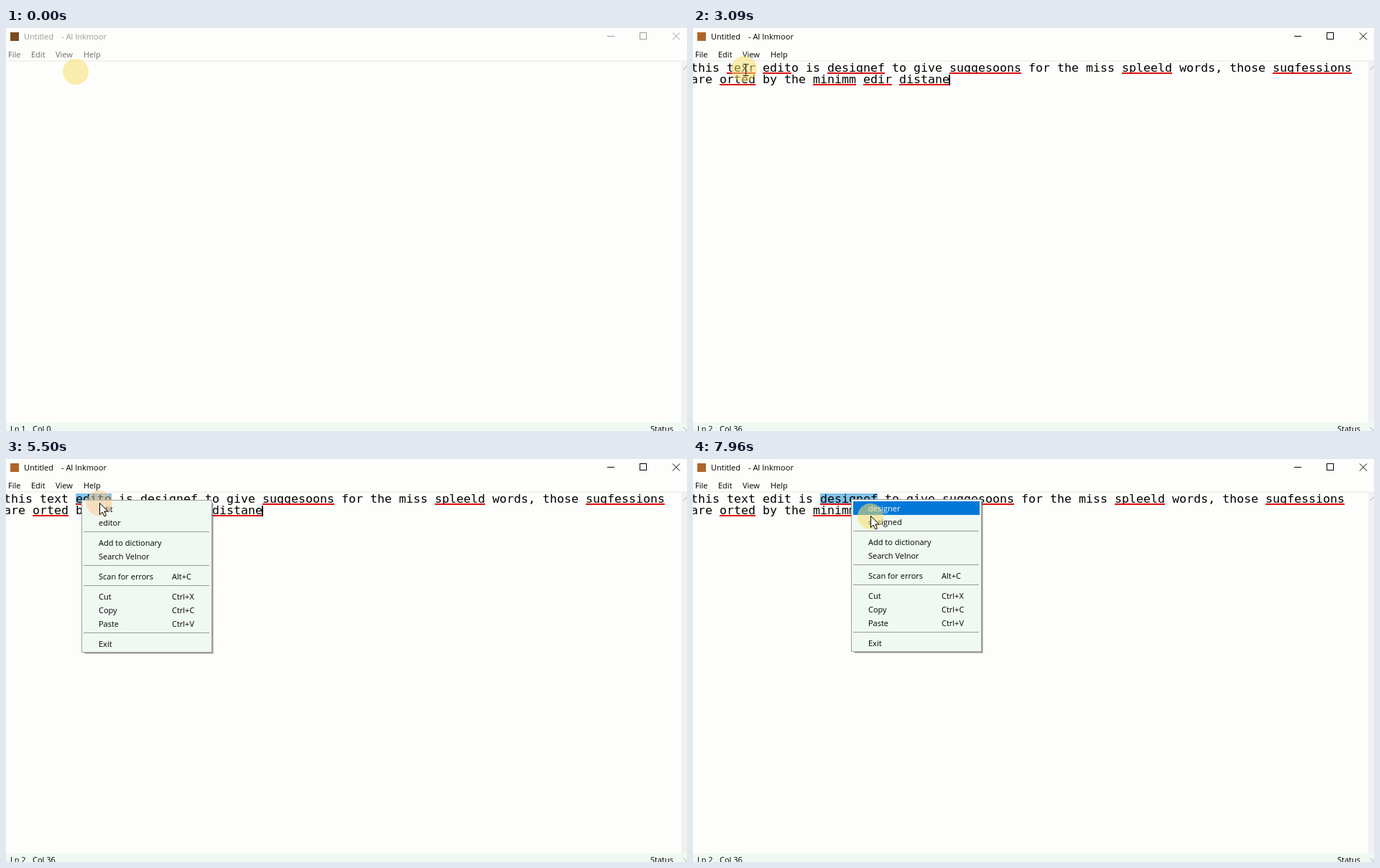
An HTML page with a canvas that plays this animation: 948x562 px, repeating every 8 s.

```html
<!DOCTYPE html>
<html lang="en">
<head>
<meta charset="utf-8">
<title>Text editor</title>
<style>
  html, body { margin: 0; width: 100%; height: 100%; overflow: hidden; background: #fdfefb; }
  canvas { display: block; }
</style>
</head>
<body>
<canvas id="stage" width="948" height="562"></canvas>
<script>
const ctx = document.getElementById('stage').getContext('2d');
const LOOP = 8000, FOCUS = 600, PASTE = 1490, CHECKED = 2020;
const UI = '11px "Open Sans", "Noto Sans", sans-serif';
const MONO = '16.61px "DejaVu Sans Mono", monospace';
const INK = '#000', PANEL = '#f0f8f2', BLUE = '#0078d7';
const CHAR = 10, TEXT_X = -3, ROW = 19, GAP = 9, HOVER_LAG = 180;

// Each menu opens at (x, y); the pointer then glides to target and clicks.
const menus = [
  { open: 3400, click: 4590, x: 71, y: 57, target: [102, 84],
    word: 'texr', suggestions: ['tear', 'text'] },
  { open: 5200, click: 6420, x: 105, y: 57, target: [153, 66],
    word: 'edito', suggestions: ['edit', 'editor'] },
  { open: 7250, click: LOOP, x: 220, y: 56, target: [247, 80],
    word: 'designef', suggestions: ['designer', 'designed'] }
];
for (const menu of menus) menu.close = menu.click + 50;

const commands = ['-', 'Add to dictionary', 'Search Velnor', '-', 'Scan for errors|Alt+C', '-',
  'Cut|Ctrl+X', 'Copy|Ctrl+C', 'Paste|Ctrl+V', '-', 'Exit'];
const misspelt = /\b(texr|edit(?=o)|designef|suggesoons|spleeld|sugfessions|orted|minimm|edir|distane)/g;
const clicks = menus.flatMap(m => [m.open - 70, m.click]);

// Pointer stops: time, x, y. It rests inside the last menu before moving on.
const stops = [[0, 97, 61], [2000, 97, 61]];
for (const { open, click, x, y, target } of menus) {
  stops.push([open - 50, x, y], [open + 50, x, y]);
  if (click === LOOP) stops.push([open + 230, x + 11, y + 6], [click - 120, x + 11, y + 6]);
  stops.push([Math.min(click, LOOP - 40), ...target]);
}

function pointerAt(t) {
  const next = stops.findIndex(s => s[0] > t);
  if (next < 0) return stops[stops.length - 1].slice(1);
  const [t0, x0, y0] = stops[next - 1], [t1, x1, y1] = stops[next];
  const eased = 1 - (1 - (t - t0) / (t1 - t0)) ** 3;
  return [x0 + (x1 - x0) * eased, y0 + (y1 - y0) * eased];
}

function rect(x, y, w, h, color) {
  ctx.fillStyle = color;
  ctx.fillRect(x, y, w, h);
}

function text(str, x, y, color = INK, font = UI) {
  ctx.font = font;
  ctx.fillStyle = color;
  ctx.fillText(str, x, y);
}

function line(color, x0, y0, x1, y1) {
  ctx.strokeStyle = color;
  ctx.lineWidth = 1;
  ctx.beginPath();
  ctx.moveTo(x0, y0);
  ctx.lineTo(x1, y1);
  ctx.stroke();
}

function drawWindow(t) {
  const active = t >= FOCUS, checked = t >= CHECKED;
  const title = active ? INK : '#999', label = active ? INK : '#6d6d6d';
  rect(0, 0, 948, 562, '#fdfefb');
  rect(0, 45, 948, 2, '#f0f3ee');
  rect(940, 47, 8, 515, '#f0f2f0');
  rect(0, 550, 948, 12, PANEL);
  rect(6, 6, 12, 12, active ? '#b06428' : '#7a4a20');
  text('Untitled', 25, 16, title);
  text('- AI Inkmoor', 77, 16, title);
  text('File', 3, 41, label);
  text('Edit', 35, 41, label);
  text('View', 69, 41, label);
  text('Help', 108, 41, label);

  line(title, 837, 11.5, 847, 11.5);
  ctx.strokeRect(882.5, 6.5, 9, 9);
  line(title, 928, 6.5, 938, 16.5);
  line(title, 938, 6.5, 928, 16.5);
  line('#a0a0a0', 943, 58, 948, 53);
  line('#a0a0a0', 943, 557, 948, 562);

  text(checked ? 'Ln 2' : 'Ln 1', 6, 563);
  text(checked ? 'Col 36' : 'Col 0', 37, 563);
  text('Status', 897, 563);
}

function drawDocument(t) {
  if (t < PASTE) return;
  const first = t < menus[0].click ? 'texr' : 'text';
  const second = t < menus[1].close ? 'edito' : 'edit';
  const content = [
    `this ${first} ${second} is designef to give suggesoons for the miss spleeld words, those sugfessions`,
    'are orted by the minimm edir distane'
  ];
  const menu = menus.find(m => t >= m.open && t < m.close);
  if (menu) {
    const start = content[0].indexOf(menu.word);
    if (start >= 0) rect(TEXT_X + start * CHAR, 48, menu.word.length * CHAR, 15, '#80c2e8');
  }
  content.forEach((row, i) => {
    const y = 61 + i * 16;
    text(row, TEXT_X, y, INK, MONO);
    if (t < CHECKED) return;
    for (const match of row.matchAll(misspelt))
      rect(TEXT_X + match.index * CHAR, y + 1, match[0].length * CHAR, 2, '#dc1010');
  });
  if (t >= CHECKED) rect(356, 65, 2, 15, INK);
}

function drawSuggestion(menu, i, hot) {
  const y = menu.y + 3 + i * ROW;
  if (hot) rect(menu.x + 3, y, 176, ROW, BLUE);
  text(menu.suggestions[i], menu.x + 24, y + 14, hot ? '#fff' : INK);
}

function drawMenu(menu, t) {
  if (t < menu.open) return;
  const { x, y } = menu;
  // Highlighting trails the pointer.
  const hoverY = pointerAt(Math.min(t, menu.click) - HOVER_LAG)[1];
  const hot = Math.floor((hoverY - y - 3) / ROW);

  if (t < menu.close) {
    ctx.globalAlpha = Math.min(1, 0.3 + (t - menu.open) / 150);
    rect(x + 5, y + 5, 179, 210, 'rgba(80,80,80,.3)');
    rect(x + 4, y + 4, 179, 210, 'rgba(80,80,80,.4)');
    rect(x, y, 182, 213, '#a0a0a0');
    rect(x + 1, y + 1, 180, 211, PANEL);
    menu.suggestions.forEach((_, i) => drawSuggestion(menu, i, i === hot));
    let top = y + 3 + menu.suggestions.length * ROW;
    for (const command of commands) {
      if (command === '-') {
        rect(x + 3, top + 3, 175, 1, '#989898');
        top += GAP;
      } else {
        const [name, keys = ''] = command.split('|');
        text(name, x + 24, top + 14);
        text(keys, x + 126, top + 14);
        top += ROW;
      }
    }
  } else {
    // The chosen entry lingers and fades after the menu closes.
    const alpha = Math.min(1, 1 - (t - menu.click - 100) / 350);
    if (alpha <= 0) return;
    ctx.globalAlpha = alpha;
    drawSuggestion(menu, hot, true);
  }
  ctx.globalAlpha = 1;
}

function circle(x, y, r) {
  ctx.beginPath();
  ctx.arc(x, y, r, 0, Math.PI * 2);
}

function drawPointer(t) {
  const [x, y] = pointerAt(t);
  const click = clicks.find(c => t >= c && t < c + 400);
  circle(x, y, 18);
  ctx.fillStyle = click === undefined ? 'rgba(248,222,110,.55)' : 'rgba(250,200,140,.5)';
  ctx.fill();
  if (click !== undefined) {
    const age = (t - click) / 400;
    circle(x, y, 9 + 14 * age);
    ctx.strokeStyle = `rgba(${205 + 40 * age},${40 + 120 * age},120,${0.75 * (1 - age)})`;
    ctx.lineWidth = 4 - 3 * age;
    ctx.stroke();
  }

  if (t < FOCUS) return;
  ctx.save();
  if (menus.some(m => t >= m.open && t < m.click)) {
    ctx.translate(Math.round(x) + 0.5, Math.round(y) - 0.5);
    const arrow = new Path2D('M0 0V16L3.7 12.5L6.4 18.5L9 17.4L6.4 11.5H11.5Z');
    ctx.fillStyle = '#fff';
    ctx.fill(arrow);
    ctx.strokeStyle = INK;
    ctx.lineWidth = 1;
    ctx.stroke(arrow);
  } else {
    ctx.translate(Math.round(x) + 2.5, Math.round(y) + 1.5);
    line('#222', 0, -8, 0, 8);
    line('#222', -4, -8, 4, -8);
    line('#222', -4, 8, 4, 8);
  }
  ctx.restore();
}

function frame() {
  const t = performance.now() % LOOP;
  drawWindow(t);
  drawDocument(t);
  for (const menu of menus) drawMenu(menu, t);
  drawPointer(t);
  requestAnimationFrame(frame);
}
frame();
</script>
</body>
</html>
```
